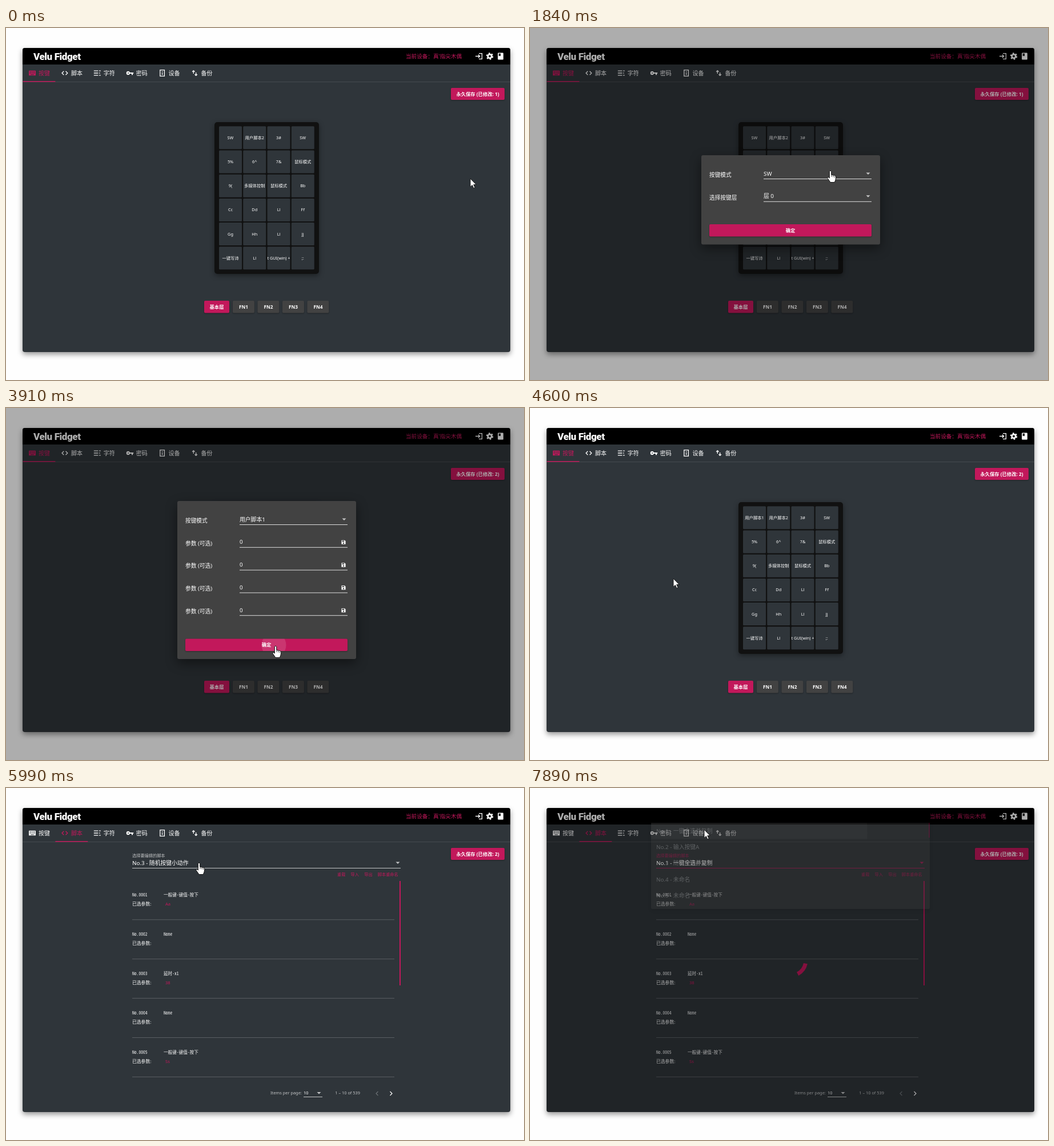
Animation, 907 px wide and 617 px high, one loop 8000 ms. Source, as an HTML page:

```html
<!DOCTYPE html>
<html lang="zh-CN">
<head>
<meta charset="utf-8">
<title>Keypad settings</title>
<style>
  html, body { margin: 0; width: 100%; height: 100%; overflow: hidden; background: #fefefe; }
  svg { display: block; }
  text { font-family: 'Noto Sans', 'Noto Sans CJK SC', sans-serif; font-weight: 500; white-space: pre; }
  .bold { font-weight: 700; }
  .mono { font-family: 'Noto Sans Mono CJK SC', 'Liberation Mono', 'Noto Sans CJK SC', monospace; }
  .brand { font: 900 17px Roboto, sans-serif; letter-spacing: -.4px; }
  .window { filter: drop-shadow(0 4px 5px rgba(0,0,0,.42)); }
  .pad { filter: drop-shadow(0 3px 5px rgba(0,0,0,.4)); }
  .raised { filter: drop-shadow(0 1px 1px rgba(0,0,0,.35)); }
  .dialog { filter: drop-shadow(0 7px 10px rgba(0,0,0,.45)); }
  .panel { filter: drop-shadow(0 2px 3px rgba(0,0,0,.4)); }
</style>
</head>
<body>
<svg id="stage" width="907" height="617" viewBox="0 0 907 617"></svg>
<script>
const LOOP = 8000, FIRST_STEP = 450, STEP = 172.8;
const PINK = '#c2185b', BG = '#2f353a', GREY = '#424242', SOFT = 'rgba(255,255,255,.7)';
const DIM = .32;

const rect = (x, y, w, h, fill, r = 0, extra = '') =>
  `<rect x="${x}" y="${y}" width="${w}" height="${h}" rx="${r}" fill="${fill}" ${extra}/>`;
const text = (x, y, s, size, fill = '#fff', cls = '', anchor = 'start') =>
  `<text x="${x}" y="${y}" font-size="${size}" fill="${fill}" class="${cls}" text-anchor="${anchor}">${s.replace(/&/g, '&amp;')}</text>`;
const group = (inner, attrs) => `<g ${attrs}>${inner}</g>`;
const clip = (x, y, w, h, inner) =>
  `<svg x="${x}" y="${y}" width="${w}" height="${h}" viewBox="${x} ${y} ${w} ${h}">${inner}</svg>`;
const disc = (x, y, r, opacity) => `<circle cx="${x}" cy="${y}" r="${r}" fill="#fff" opacity="${opacity}"/>`;
const caret = (x, y, fill = SOFT) => `<path d="M${x - 3.5} ${y - 1.5}h7l-3.5 3.5z" fill="${fill}"/>`;
const button = (x, y, w, h, label, fill = PINK) =>
  rect(x, y, w, h, fill, 2, 'class="raised"') + text(x + w / 2, y + h / 2 + 3.2, label, 8.3, '#fff', 'bold', 'middle');

// Icons live on a 24 unit grid; S strokes, F fills.
const S = (d, c) => `<path d="${d}" fill="none" stroke="${c}" stroke-width="2.4"/>`;
const F = (d, c) => `<path d="${d}" fill="${c}" fill-rule="evenodd"/>`;
const ICONS = {
  keyboard: c => F('M2 4h20q1 0 1 1v14q0 1-1 1H2q-1 0-1-1V5q0-1 1-1zM4 7v3h3V7zM9 7v3h2V7zM13 7v3h2V7zM17 7v3h3V7zM4 12v2h3v-2zM9 12v2h2v-2zM13 12v2h2v-2zM17 12v2h3v-2zM7 16v2h10v-2z', c),
  code: c => S('M9 6l-6 6 6 6M15 6l6 6-6 6', c),
  lines: c => S('M1 5h14M1 12h14M1 19h14M18 5h5M18 12h3M18 19h5', c),
  key: c => F('M7 6q4 0 5.5 4H24v4h-2v4h-4v-4h-5.5Q11 18 7 18a6 6 0 0 1 0-12zM7 10a2 2 0 0 0 0 4 2 2 0 0 0 0-4z', c),
  device: c => S('M5 2h14v20H5zM12 6v3M12 11v7', c),
  swap: c => S('M8 14V4M4 8l4-4 4 4M16 10v10M12 16l4 4 4-4', c),
  login: c => S('M1 12h14M10 7l5 5-5 5M12 3h10v18H12', c),
  gear: c => `<circle cx="12" cy="12" r="6" fill="none" stroke="${c}" stroke-width="5"/>
    <circle cx="12" cy="12" r="9.5" fill="none" stroke="${c}" stroke-width="4" stroke-dasharray="5 4.95"/>`,
  book: c => F('M5 1h14q2 0 2 2v18q0 2-2 2H5q-2 0-2-2V3q0-2 2-2zM6 3v9l3-2 3 2V3z', c),
  save: c => F('M3 3h14l4 4v14H3zM6 5v5h9V5zM12 13a3 3 0 0 0 0 6 3 3 0 0 0 0-6z', c),
  prev: c => S('M15 5l-7 7 7 7', c),
  next: c => S('M9 5l7 7-7 7', c),
};
const icon = (name, x, y, size = 13, c = '#fff') =>
  group(ICONS[name](c), `transform="translate(${x - size / 2} ${y - size / 2}) scale(${size / 24})"`);

const TABS = [['keyboard', '按键'], ['code', '脚本'], ['lines', '字符'], ['key', '密码'], ['device', '设备'], ['swap', '备份']];

function frame(activeTab, changes) {
  const tabs = TABS.map(([name, label], i) => {
    const x = 46 + i * 56.9, c = i === activeTab ? PINK : '#fff';
    return icon(name, x, 79, 13, c) + text(x + 11, 83, label, 10, c);
  }).join('');
  return rect(29, 35, 854, 533, BG, 4, 'class="window"')
    + `<path d="M29 64V39q0-4 4-4h846q4 0 4 4v25z"/>`
    + text(48, 56, 'Velu Fidget', 17, '#fff', 'brand')
    + text(700, 53, "当前设备：真'指尖木偶", 9.6, PINK)
    + icon('login', 828, 49.5) + icon('gear', 847, 49.5) + icon('book', 866, 49.5)
    + tabs + rect(29, 94, 854, 1, '#464b4f') + rect(29.5 + activeTab * 56.9, 93, 56.9, 1.5, PINK)
    + button(779, 105, 94, 21, `永久保存 (已修改: ${changes})`);
}

const KEYS = ['SW', '用户脚本2', '3#', 'SW', '5%', '6^', '7&', '鼠标模式', '9(', '多媒体控制', '鼠标模式', 'Bb',
  'Cc', 'Dd', 'Ll', 'Ff', 'Gg', 'Hh', 'Ll', 'Jj', '一键写诗', 'Ll', 't GUI(win) +', ';:'];

function keysPage(firstKey) {
  const keys = KEYS.map((label, i) => {
    const x = 373 + i % 4 * 42.25, y = 172.3 + Math.floor(i / 4) * 42.2;
    return rect(x, y, 40, 40, BG, 1.5)
      + clip(x, y, 40, 40, text(x + 20, y + 22.5, i ? label : firstKey, 7.3, '#fff', '', 'middle'));
  }).join('');
  const layers = [1, 2, 3, 4].map(n => button(353.4 + n * 43.5, 478, 38, 21.5, 'FN' + n, GREY)).join('');
  return rect(365, 165, 183, 266, '#111', 5, 'class="pad"') + keys + button(347, 478, 44, 21.5, '基本层') + layers;
}

const field = (y, label, value, mark) =>
  text(314, y + 5.7, label, 9.7) + text(409, y + 3.5, value, 9.8) + rect(409, y + 9, 189, 1, '#ddd') + mark;

function dialog(rows, top, height, ripple) {
  const okY = top + height - 35.5;
  const body = rows.map(([label, value, isSelect], i) => {
    const y = top + 32 + i * 39.8;
    return field(y, label, value, isSelect ? caret(592, y) : icon('save', 591, y + .5, 9.5));
  }).join('');
  return rect(300, top, 313, height, GREY, 3, 'class="dialog"') + body + button(314, okY, 284, 21.5, '确定')
    + (ripple ? clip(314, okY, 284, 21.5, disc(469, okY + 11, ripple, .13)) : '');
}
const layerDialog = () => dialog([['按键模式', 'SW', 1], ['选择按键层', '层 0', 1]], 223, 156.5);
const scriptDialog = ripple => dialog(
  [['按键模式', '用户脚本1', 1], ...Array(4).fill(['参数 (可选)', '0'])], 163, 277, ripple);

function optionPanel(x, y, w, options, selected, hover, ripple = 0) {
  const h = 28.4;
  return rect(x, y, w, 151, GREY, 2, 'class="panel"')
    + options.map((s, i) =>
      (i === selected ? rect(x, y + i * h, w - 2, h, '#575757') : i === hover ? rect(x, y + i * h, w - 2, h, '#4b4b4b') : '')
      + text(x + 9, y + 17.6 + i * h, s, 9.8, i === selected ? PINK : '#fff')).join('')
    + (ripple ? clip(x, y, w - 2, h, disc(343, y + 17, ripple, .1)) : '')
    + rect(x + w - 2, y, 2, 26, PINK);
}

const MODES = ['鼠标模式', '多媒体控制', 'SW', '用户脚本1', '用户脚本2'];
const SCRIPTS = ['No.1 - 一键全选并复制', 'No.2 - 输入按键A', 'No.3 - 随机按键小动作', 'No.4 - 未命名', 'No.5 - 未命名'];
const COMMANDS = [['一般键-键值-按下', 'Aa'], ['None', ''], ['延时-x1', '38'], ['None', ''], ['一般键-键值-按下', 'Ss']];

function scriptsPage(loaded, value, focused) {
  const accent = focused ? PINK : SOFT, dx = loaded ? -25 : 0;
  const list = COMMANDS.map(([name, arg], i) => {
    const y = 190.3 + i * 68.9;
    return text(221, y, `No.000${i + 1}`, 7.6, '#fff', 'mono') + text(276, y, name, 7.6, '#fff', 'mono')
      + text(221, y + 16, '已选参数:', 7.8) + text(279, y + 16, arg, 7.6, PINK)
      + rect(221, y + 40, 459, 1, '#595e62');
  }).join('') + rect(689, 163, 2, 183, PINK);
  return (loaded ? text(221, 121, '选择要编辑的脚本', 7.2, accent) + text(221, 135, value, 9.8)
                 : text(221, 135, '选择要编辑的脚本', 9.7, SOFT))
    + rect(221, 140, 470, 1, accent) + caret(686, 131, accent)
    + ['重载', '导入', '导出', '脚本重命名'].map((s, i) => text(580 + i * 23.6, 154, s, 7.2, PINK)).join('')
    + (loaded ? list : '')
    + text(488 + dx, 537, 'Items per page:', 7.4, SOFT) + text(546 + dx, 537, '10', 7.4)
    + rect(546 + dx, 541, 33, 1, SOFT) + caret(573 + dx, 534.5)
    + text(620, 537, loaded ? '1 – 10 of 539' : '0 of 0', 7.4, SOFT, '', 'end')
    + icon('prev', 650, 535.5, 12, '#6b7074') + icon('next', 674, 535.5, 12, loaded ? '#fff' : '#6b7074');
}

function spinner(from, to) {
  const at = deg => {
    const a = deg * Math.PI / 180;
    return `${456 + 27 * Math.cos(a)} ${302 + 27 * Math.sin(a)}`;
  };
  return `<path d="M${at(from)}A27 27 0 0 1 ${at(to)}" fill="none" stroke="${PINK}" stroke-width="7"/>`;
}
const loadingShade = () => rect(29, 35, 854, 533, '#000', 4, `opacity="${DIM}"`);

// Pointer way points: step, x, y, hand shape.
const PATH = [[-1, 813, 264, 0], [0, 745, 252, 0], [2, 470, 205, 1], [3, 396, 192, 1], [5, 396, 192, 1], [6, 430, 206, 1],
  [7, 489, 232, 1], [8, 526, 250, 1], [10, 526, 250, 1], [12, 500, 278, 1], [16, 500, 278, 1], [19, 472, 417, 1],
  [21, 472, 417, 1], [22, 430, 395, 0], [24, 251, 299, 0], [27, 128, 92, 0], [28, 123, 84, 0], [29, 123, 84, 0],
  [30, 182, 130, 0], [32, 338, 131, 1], [36, 341, 131, 1], [37, 342, 70, 1], [42, 342, 70, 1], [43, 305, 73, 0]];

function pointer(step) {
  const i = Math.max(0, PATH.findLastIndex(p => p[0] <= step));
  const a = PATH[i], b = PATH[i + 1] || a;
  const f = b === a ? 0 : (step - a[0]) / (b[0] - a[0]);
  const x = a[1] + (b[1] - a[1]) * f, y = a[2] + (b[2] - a[2]) * f;
  const shape = a[3]
    ? `<path d="M-1.7 1.3q1.7-2.4 3.4 0v6l5.8 1.3q2.3.5 2.3 2.6l-.8 5-1.7 4.3h-7.3l-5-7.2q-.5-2.2 1.6-1.8l1.7 1.6z" fill="#fff" stroke="#111"/>
       <path d="M2 8v3M5 9v2.5M7.6 10v2" stroke="#111" stroke-width=".8"/>`
    : '<path d="M0 0v14.5l3.4-3.1 2.4 5.3 2.3-1-2.4-5.2h4.5z" fill="#fff" stroke="#111" stroke-width=".9"/>';
  return group(shape, `transform="translate(${x} ${y})"`);
}

const fade = (inner, opacity) => group(inner, `opacity="${opacity}"`);
const zoom = (inner, s, opacity) =>
  group(inner, `opacity="${opacity}" transform="translate(456 301) scale(${s}) translate(-456 -301)"`);
const shade = opacity => rect(0, 0, 907, 617, '#000', 0, `opacity="${opacity}"`);

function scene(k) {
  const scripts = k >= 28;
  let out = frame(scripts ? 1 : 0, k < 14 ? 1 : k < 43 ? 2 : 3);
  if (!scripts) {
    out += keysPage(k < 14 ? 'SW' : '用户脚本1');
    if (k === 5) out += shade(.18) + zoom(layerDialog(), .88, .6);
    if (k >= 6 && k < 14) out += shade(DIM) + layerDialog();
    if (k >= 14 && k < 21) out += shade(DIM) + scriptDialog(k === 19 ? 9 : k === 20 ? 21.5 : 0);
    if (k === 21) out += shade(.2) + fade(scriptDialog(30), .5);
    if (k === 22) out += shade(.06);
    if (k >= 10 && k <= 14) {
      const modes = optionPanel(400, 184, 207, MODES, 2, k >= 12 ? 3 : -1);
      out += fade(modes, k === 10 ? .6 : k === 14 ? .3 : 1);
    }
  } else {
    out += scriptsPage(k >= 31, SCRIPTS[k < 43 ? 2 : 0], k >= 34);
    if (k === 29) out += spinner(8, 38) + loadingShade();
    if (k === 43) out += spinner(12, 62) + loadingShade();
    if (k >= 35) {
      const list = optionPanel(212, 61, 488, SCRIPTS, k < 43 ? 2 : -1, k >= 37 ? 0 : -1, k >= 39 ? (k - 38) * 49.5 : 0);
      out += fade(list, k === 35 ? .6 : k === 43 ? .27 : 1);
    }
  }
  return out + pointer(k);
}

const stage = document.getElementById('stage');
const start = performance.now();
let shown = null;
function tick() {
  const t = (performance.now() - start) % LOOP;
  const step = Math.max(-1, Math.floor((t - FIRST_STEP) / STEP));
  if (step !== shown) stage.innerHTML = scene(shown = step);
  requestAnimationFrame(tick);
}
tick();
</script>
</body>
</html>
```
